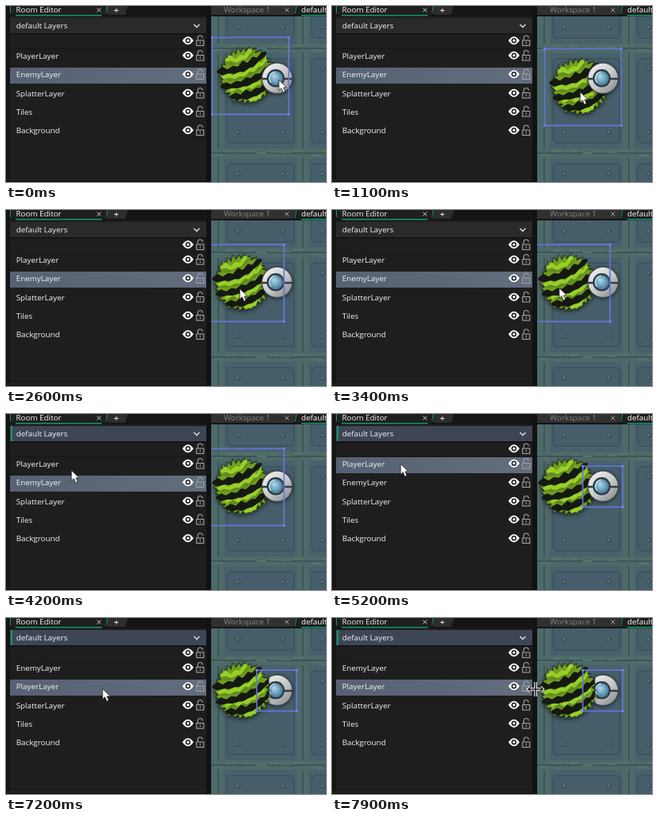
These frames come from a looping animation (401 by 220 pixels, 8000 ms). An HTML page with a canvas:

```html
<!DOCTYPE html>
<html lang="en">
<head>
<meta charset="utf-8">
<title>Room layers</title>
<style>
html, body { margin: 0; width: 100%; height: 100%; overflow: hidden; background: #161616; }
canvas { display: block; width: 401px; height: 220px; }
</style>
</head>
<body>
<canvas id="stage" width="401" height="220"></canvas>
<script>
const ctx = document.getElementById('stage').getContext('2d');
const LOOP = 8000;
const FONT = '9.8px "Open Sans", "Noto Sans", sans-serif';
const GREEN = '#129a66';
const SELECT = '#6575d8';
const ROWS = [62, 85.5, 109, 132, 155.5];
const BALL = { x: 339.7, y: 90.3 };

// Keys are [time, x, y]; motion eases between neighbours.
const CURSOR = [
  [0, 342, 92], [100, 341, 92], [550, 303, 94], [750, 304, 96], [1100, 311, 107],
  [1350, 305, 109], [1700, 293, 98], [3300, 293, 98], [4150, 82, 70],
  [4700, 82, 70], [5200, 86, 62], [6000, 119, 64], [6500, 119, 64],
  [7000, 121, 88], [7250, 121, 88], [7800, 255, 89]
];
const ENEMY = [
  [0, 306, 87], [600, 306, 87], [750, 307, 89], [1100, 314, 101],
  [1350, 309, 103], [1700, 300, 91]
];

function at(keys, t) {
  for (let i = 1; i < keys.length; i++) {
    const a = keys[i - 1], b = keys[i];
    if (t < b[0]) {
      let k = (t - a[0]) / (b[0] - a[0]);
      k = k * k * (3 - 2 * k);
      return { x: a[1] + (b[1] - a[1]) * k, y: a[2] + (b[2] - a[2]) * k };
    }
  }
  const last = keys[keys.length - 1];
  return { x: last[1], y: last[2] };
}

function rect(x, y, w, h, color) {
  ctx.fillStyle = color;
  ctx.fillRect(x, y, w, h);
}

function disc(x, y, r, color) {
  ctx.fillStyle = color;
  ctx.beginPath();
  ctx.arc(x, y, r, 0, Math.PI * 2);
  ctx.fill();
}

function poly(points, fill) {
  ctx.beginPath();
  points.forEach(([x, y], i) => i ? ctx.lineTo(x, y) : ctx.moveTo(x, y));
  if (fill) {
    ctx.closePath();
    ctx.fillStyle = fill;
    ctx.fill();
  }
}

function line(points, color, width = 1) {
  poly(points);
  ctx.strokeStyle = color;
  ctx.lineWidth = width;
  ctx.stroke();
}

function text(s, x, y, color = '#f4f4f4') {
  ctx.font = FONT;
  ctx.textBaseline = 'alphabetic';
  ctx.fillStyle = color;
  ctx.fillText(s, x, y);
}

function cross(x, y, color) {
  line([[x - 2.5, y - 2.5], [x + 2.5, y + 2.5]], color);
  line([[x + 2.5, y - 2.5], [x - 2.5, y + 2.5]], color);
}

function rand(n) {
  const v = Math.sin(n * 12.9898 + 4.1) * 43758.5453;
  return v - Math.floor(v);
}

function drawFloor() {
  rect(257, 13, 144, 207, '#48616b');
  for (let x = 266; x < 402; x += 106) {
    rect(x - 8, 13, 15, 207, '#4d6a69');
    rect(x - 1, 13, 2, 207, '#3c545a');
  }
  for (let y = 53; y < 220; y += 131) {
    rect(257, y - 6, 144, 12, '#4d6a69');
    rect(257, y - 1, 144, 2, '#3c545a');
    for (let i = 0; i < 9; i++)
      rect(257 + i * 17 + rand(i) * 8, y - 6 + rand(i + 9) * 9, 12, 2, '#587568');
  }
  for (let y = -65; y < 220; y += 131) {
    for (let x = 277; x < 402; x += 106) {
      ctx.beginPath();
      ctx.roundRect(x, y, 84, 105, 5);
      ctx.fillStyle = '#455e6a';
      ctx.fill();
      ctx.strokeStyle = '#3a525d';
      ctx.lineWidth = 1.4;
      ctx.stroke();
      for (const bx of [x + 14, x + 70])
        for (const by of [y + 13, y + 92]) {
          disc(bx, by, 3, '#3a515c');
          disc(bx - 0.5, by - 0.5, 1.7, '#58717a');
        }
    }
  }
}

function furEdge(radius, seed) {
  const edge = [], n = 30;
  for (let i = 0; i < n; i++) {
    const a = i / n * Math.PI * 2;
    const tip = radius + 4 + rand(seed + i) * 4;
    edge.push([Math.cos(a) * radius, Math.sin(a) * radius]);
    edge.push([Math.cos(a + 0.16) * tip, Math.sin(a + 0.16) * tip]);
  }
  return edge;
}

// A jagged band across the body, bowed downwards in the middle.
function furBand(y, thick, spike, color, seed, reach) {
  const half = Math.sqrt(reach * reach - y * y);
  const n = Math.round(half / 3.2), top = [], low = [];
  for (let i = 0; i <= n; i++) {
    const u = i / n * 2 - 1;
    const mid = y - 7 * u * u + 3;
    const h = thick / 2 * (1 - 0.6 * u * u);
    const j = i % 2 ? spike * (0.5 + rand(seed + i)) : 0;
    top.push([u * half + j * 0.5, mid - h - j]);
    low.unshift([u * half - j * 0.3, mid + h + j * 0.4]);
  }
  poly(top.concat(low), color);
}

function drawEnemy({ x, y }) {
  ctx.save();
  ctx.translate(x - 4, y);
  ctx.rotate(-0.38);
  ctx.shadowColor = 'rgba(0,0,0,.55)';
  ctx.shadowBlur = 5;
  ctx.shadowOffsetY = 2;
  poly(furEdge(31, 5), '#202a12');
  ctx.shadowColor = 'transparent';
  poly(furEdge(29.5, 5), '#719f20');
  [-24, -5, 13, 27].forEach((band, i) => {
    furBand(band, 6, 4, '#98cf27', i * 31 + 8, 30);
    furBand(band + 3, 2, 2.5, '#638d1f', i * 17 + 3, 29);
  });
  [-14, 5, 21].forEach((band, i) =>
    furBand(band, 7, 3.2, '#151911', i * 23 + 2, 36));
  ctx.restore();
}

function drawBall() {
  const { x, y } = BALL;
  ctx.save();
  ctx.shadowColor = 'rgba(0,0,0,.55)';
  ctx.shadowBlur = 4;
  ctx.shadowOffsetY = 1;
  disc(x, y, 19.7, '#41474a');
  ctx.restore();
  const metal = ctx.createLinearGradient(x - 14, y - 16, x + 14, y + 16);
  metal.addColorStop(0, '#eeeeed');
  metal.addColorStop(0.55, '#c6c8c8');
  metal.addColorStop(1, '#8b9092');
  disc(x, y, 18.5, metal);
  rect(x - 19, y - 0.5, 38, 2.5, '#343a3d');
  disc(x - 1.7, y, 11.2, '#2e3a42');
  const glass = ctx.createRadialGradient(x - 4, y - 3, 1, x - 1.7, y, 10);
  glass.addColorStop(0, '#a9d3e4');
  glass.addColorStop(0.5, '#72a6c1');
  glass.addColorStop(1, '#3c6c89');
  disc(x - 1.7, y, 9, glass);
  ctx.beginPath();
  ctx.arc(x - 1.7, y, 8, 2.4, 4.6);
  ctx.strokeStyle = '#c4e1eb';
  ctx.lineWidth = 1.5;
  ctx.stroke();
}

function selection(x, y, w, h) {
  ctx.strokeStyle = SELECT;
  ctx.lineWidth = 1.7;
  ctx.strokeRect(x, y, w, h);
  for (const cx of [x, x + w])
    for (const cy of [y, y + h]) disc(cx, cy, 1.7, '#7080e8');
}

function drawRoom(t, ballPicked, swapped) {
  const enemy = at(ENEMY, t);
  ctx.save();
  ctx.beginPath();
  ctx.rect(257, 13, 144, 207);
  ctx.clip();
  drawFloor();
  if (swapped) {
    drawBall();
    drawEnemy(enemy);
  } else {
    drawEnemy(enemy);
    drawBall();
  }
  if (ballPicked) selection(314.3, 65.3, 50, 51);
  else selection(enemy.x - 47.6, enemy.y - 47.6, 96, 96);
  ctx.restore();
}

function drawEye(x, y) {
  ctx.beginPath();
  ctx.moveTo(x - 7, y);
  ctx.quadraticCurveTo(x, y - 10, x + 7, y);
  ctx.quadraticCurveTo(x, y + 10, x - 7, y);
  ctx.fillStyle = '#ffffff';
  ctx.fill();
  disc(x, y, 3.2, '#202225');
  disc(x, y, 1.6, '#ffffff');
}

function drawLock(x, y) {
  ctx.strokeStyle = '#a2a4a6';
  ctx.lineWidth = 1.1;
  ctx.strokeRect(x - 4.5, y - 0.5, 9, 6.5);
  ctx.beginPath();
  ctx.moveTo(x - 3, y - 1);
  ctx.lineTo(x - 3, y - 3.5);
  ctx.arc(x, y - 3.5, 3, Math.PI, 0);
  ctx.stroke();
  rect(x - 0.5, y + 1, 1, 3, '#a2a4a6');
}

function drawPanel(focused, selected, names) {
  rect(0, 0, 257, 220, '#141414');
  rect(5, 13, 246, 204, '#1e1e1e');
  rect(5, 15, 246, 19, focused ? '#3e4656' : '#2a2a2a');
  if (focused) rect(6, 15, 2, 19, GREEN);
  rect(5, 34, 246, 2, '#151515');
  rect(5, 53, 246, 1, '#171717');
  text('default Layers', 12.7, 28);
  line([[235.5, 23], [239, 26.5], [242.5, 23]], '#e0e0e0', 1.4);

  const grad = ctx.createLinearGradient(5, 0, 251, 0);
  grad.addColorStop(0, '#566173');
  grad.addColorStop(1, '#626d7d');
  rect(5, Math.floor(ROWS[selected]) - 8, 246, 20, grad);
  names.forEach((name, i) => text(name, 12.7, ROWS[i] + 3.7));
  for (const y of [43.5, ...ROWS]) {
    drawEye(228, y - 0.3);
    drawLock(243.3, y);
  }
  rect(0, 217, 257, 1, '#2b2b2b');
  rect(251, 13, 6, 207, '#121212');
}

function drawTabs() {
  rect(0, 0, 401, 13, '#151515');
  poly([[5, 0], [127, 0], [125, 11], [5, 11]], '#1f1f1f');
  poly([[127, 0], [153, 0], [149, 11], [127, 11]], '#2d2d2d');
  rect(12, 11, 108, 1.5, GREEN);
  line([[5.5, 0], [5.5, 9]], GREEN);
  line([[127, 0], [125.5, 9]], GREEN);
  text('Room Editor', 12.5, 8);
  cross(116.5, 5, '#d0d0d0');
  line([[135.5, 5.5], [141, 5.5]], '#e0e0e0');
  line([[138.2, 3], [138.2, 8]], '#e0e0e0');
  rect(251, 0, 6, 13, '#121212');
  poly([[257, 0], [363, 0], [360, 11], [257, 11]], '#303030');
  text('Workspace 1', 273, 8, '#858585');
  cross(352, 5, '#a0a0a0');
  poly([[364, 0], [401, 0], [401, 11], [362, 11]], '#1f1f1f');
  line([[364, 0], [362, 10]], GREEN);
  rect(370, 11, 31, 1.5, GREEN);
  text('default', 370, 8, '#ffffff');
}

function drawArrow(x, y) {
  const shape = [[0, 0], [0, 13], [3, 10.2], [5.2, 15.5], [7.8, 14.4], [5.6, 9.4], [9.6, 9.4]];
  ctx.save();
  ctx.translate(x, y + 0.5);
  poly(shape, '#ffffff');
  ctx.strokeStyle = '#202020';
  ctx.lineWidth = 0.8;
  ctx.stroke();
  ctx.restore();
}

function drawSplitter(x, y) {
  for (const [color, w] of [['#f0f0f0', 3.6], ['#151515', 1.4]]) {
    line([[x - 9, y], [x + 9, y]], color, w);
    line([[x, y - 9], [x, y + 9]], color, w);
    line([[x - 6, y - 3], [x - 9, y], [x - 6, y + 3]], color, w);
    line([[x + 6, y - 3], [x + 9, y], [x + 6, y + 3]], color, w);
  }
}

function draw(t) {
  const picked = t >= 5200;
  const swapped = t >= 7150;
  const cursor = at(CURSOR, t);
  const names = ['PlayerLayer', 'EnemyLayer', 'SplatterLayer', 'Tiles', 'Background'];
  if (swapped) [names[0], names[1]] = [names[1], names[0]];
  drawPanel(t >= 4000, picked && !swapped ? 0 : 1, names);
  drawRoom(t, picked, swapped);
  drawTabs();
  if (swapped && cursor.x > 249) drawSplitter(cursor.x, cursor.y);
  else drawArrow(cursor.x, cursor.y);
}

const start = performance.now();
function tick() {
  draw((performance.now() - start) % LOOP);
  requestAnimationFrame(tick);
}
tick();
</script>
</body>
</html>
```
